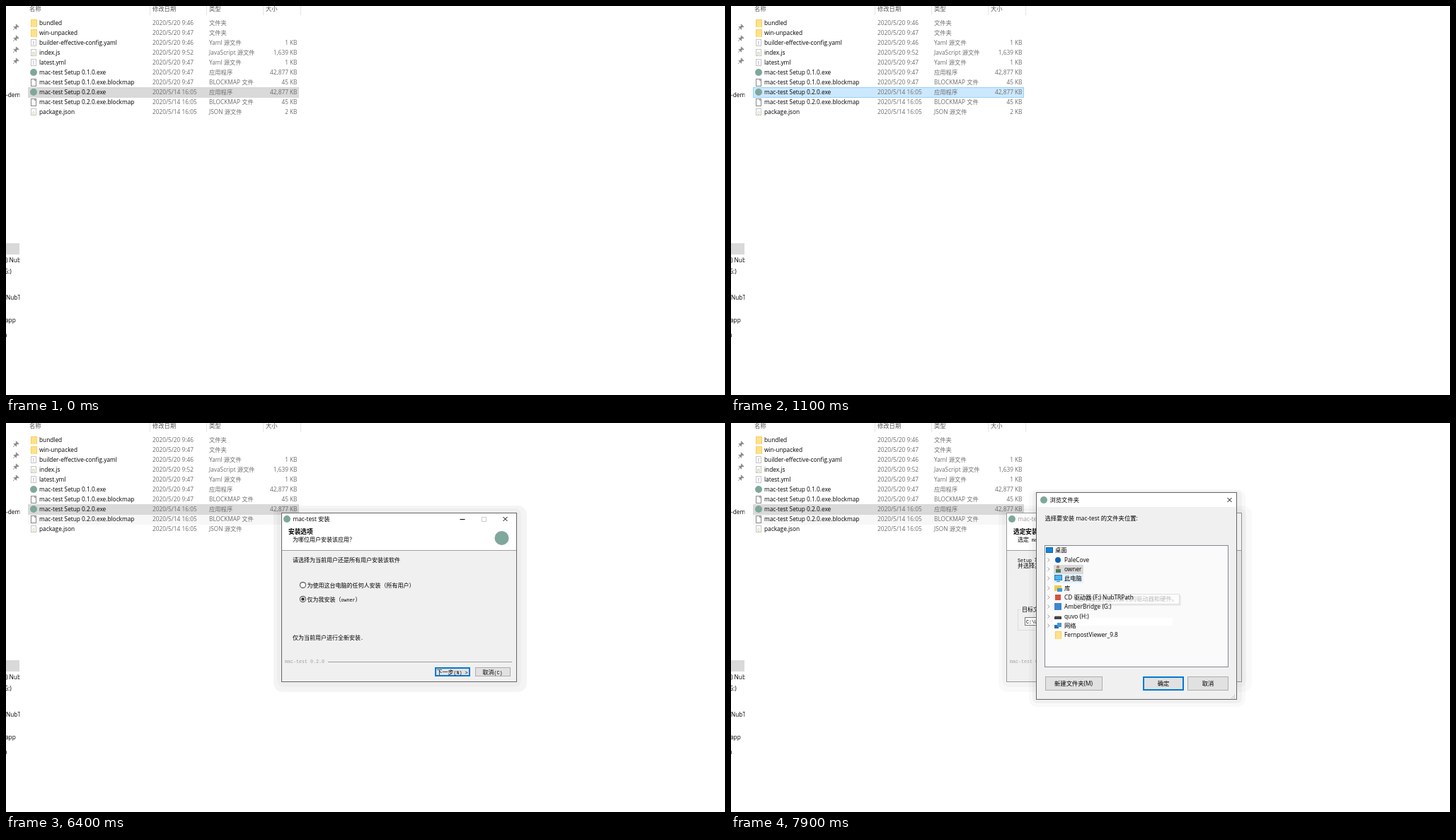
These frames come from a looping animation (1016x551 px, 8 s). An HTML page with a canvas:

```html
<!DOCTYPE html>
<html lang="zh-CN">
<head>
<meta charset="utf-8">
<title>mac-test 安装</title>
<style>
html, body { margin: 0; width: 100%; height: 100%; overflow: hidden; background: #fff; }
canvas { display: block; }
</style>
</head>
<body>
<canvas id="stage" width="1016" height="551"></canvas>
<script>
const LOOP = 8000;
const ctx = document.getElementById('stage').getContext('2d');
const CJK = '"Noto Sans CJK SC", "Noto Sans CJK JP", "Noto Sans CJK", sans-serif';
const UI = '"Open Sans", ' + CJK;
const MONO = '"Liberation Mono", monospace';
const BLUE = '#0078d7', APP = '#7fa79b';

const files = [
  ['bundled', '2020/5/20 9:46', '文件夹', '', 'folder'],
  ['win-unpacked', '2020/5/20 9:47', '文件夹', '', 'folder'],
  ['builder-effective-config.yaml', '2020/5/20 9:46', 'Yaml 源文件', '1 KB', '!'],
  ['index.js', '2020/5/20 9:52', 'JavaScript 源文件', '1,639 KB', 'JS'],
  ['latest.yml', '2020/5/20 9:47', 'Yaml 源文件', '1 KB', '!'],
  ['mac-test Setup 0.1.0.exe', '2020/5/20 9:47', '应用程序', '42,877 KB', 'app'],
  ['mac-test Setup 0.1.0.exe.blockmap', '2020/5/20 9:47', 'BLOCKMAP 文件', '45 KB', 'page'],
  ['mac-test Setup 0.2.0.exe', '2020/5/14 16:05', '应用程序', '42,877 KB', 'app'],
  ['mac-test Setup 0.2.0.exe.blockmap', '2020/5/14 16:05', 'BLOCKMAP 文件', '45 KB', 'page'],
  ['package.json', '2020/5/14 16:05', 'JSON 源文件', '2 KB', '{}']
];
const tree = ['PaleCove', 'owner', '此电脑', '库', 'CD 驱动器 (F:) NubTRPath',
  'AmberBridge (G:)', 'quvo (H:)', '网络', 'FernpostViewer_9.8'];

function fill(x, y, w, h, color) {
  ctx.fillStyle = color;
  ctx.fillRect(x, y, w, h);
}

function box(x, y, w, h, color, edge, line = 1) {
  fill(x, y, w, h, color);
  ctx.strokeStyle = edge;
  ctx.lineWidth = line;
  ctx.strokeRect(x + line / 2, y + line / 2, w - line, h - line);
}

function path(points, color, width = 1) {
  ctx.beginPath();
  points.forEach(([x, y]) => ctx.lineTo(x, y));
  ctx.strokeStyle = color;
  ctx.lineWidth = width;
  ctx.stroke();
}

function disc(x, y, r, color) {
  ctx.beginPath();
  ctx.arc(x, y, r, 0, 7);
  ctx.fillStyle = color;
  ctx.fill();
}

// y is the middle of the line in both text helpers
function text(s, x, y, color = '#000', align = 'left', size = 8.3) {
  ctx.font = size + 'px ' + UI;
  ctx.textAlign = align;
  ctx.fillStyle = color;
  ctx.fillText(s, x, y + 3);
}

// Half-width Latin next to full-width Chinese
function song(s, x, y, color = '#000', size = 8, weight = '') {
  ctx.textAlign = 'left';
  ctx.fillStyle = color;
  for (const run of s.match(/[ -~]+|[^ -~]+/g)) {
    const latin = run.charCodeAt(0) < 127;
    ctx.font = `${weight} ${latin ? size / 1.2 : size}px ${latin ? MONO : CJK}`;
    ctx.fillText(run, x, y + 3);
    x += run.length * size / (latin ? 2 : 1);
  }
}

function halo(x, y, w, h, r, alpha) {
  ctx.fillStyle = `rgba(0,0,0,${alpha})`;
  ctx.beginPath();
  ctx.roundRect(x, y, w, h, r);
  ctx.fill();
}

function button(x, y, w, h, state) {
  const [color, edge, line] = {
    plain: ['#e1e1e1', '#adadad', 1],
    main: ['#e1e1e1', BLUE, 2],
    warm: ['#e3e9ee', BLUE, 2],
    hover: ['#e5f1fb', BLUE, 1],
    press: ['#cce4f7', '#005499', 1]
  }[state];
  box(x, y, w, h, color, edge, line);
}

function cross(x, y) {
  path([[x - 3, y - 3], [x + 3, y + 3]], '#000');
  path([[x + 3, y - 3], [x - 3, y + 3]], '#000');
}

function folder(x, y) {
  fill(x, y - 5, 9, 11, '#f5cf5d');
  fill(x + 1, y - 4, 7, 10, '#ffe18a');
}

function fileIcon(kind, y) {
  if (kind === 'folder') return folder(35, y);
  if (kind === 'app') return disc(39, y, 5, APP);
  const blank = kind === 'page';
  box(35, y - 5, 8, blank ? 11 : 10, '#fff', blank ? '#888' : '#c4c4c4');
  if (blank) path([[40.5, y - 5], [40.5, y - 2.5], [43, y - 2.5]], '#888');
  else text(kind, 39, y, { '!': '#8a4fa0', JS: '#87a63c', '{}': '#b4a25a' }[kind], 'center', kind === '!' ? 7 : 5);
}

function pin(y) {
  path([[10, y + 4], [13, y + 1]], '#999');
  path([[11, y - 1], [15, y + 3]], '#8a8a8a', 1.5);
  path([[13, y + 1], [16, y - 2]], '#8a8a8a', 3);
  path([[14, y - 4], [18, y]], '#8a8a8a', 1.5);
}

function sidebar() {
  [30, 46, 62, 78].forEach(pin);
  ctx.save();
  ctx.beginPath();
  ctx.rect(0, 0, 19.5, 551);
  ctx.clip();
  fill(0, 336, 19, 16, '#d9d9d9');
  text('-demo', 0, 126);
  text(') NubTRPath', 0, 360);
  text('G:)', -3, 376);
  text('NubTRPath', 0, 413);
  text('app', -1, 445);
  text('n', -3.5, 466);
  ctx.restore();
}

function explorer(t) {
  sidebar();
  [[33, '名称'], [207, '修改日期'], [287, '类型'], [367, '大小']].forEach(([x, s]) => text(s, x, 4, '#555'));
  [203, 283, 363, 416].forEach(x => fill(x, 0, 1, 13, '#e5e5e5'));

  const rowAt = i => 17 + 14 * i;
  if (t >= 600 && t < 800) fill(31, rowAt(6), 383, 14, '#e5f3ff');
  const below = (t >= 900 && t < 1100) || t >= 3900;
  if (below) fill(31, rowAt(8), 383, 15, t < 5800 ? '#e5f3ff' : '#f7f7f7');
  const lit = (t >= 500 && t < 600) || (t >= 800 && t < 900) || (t >= 1100 && t < 5400);
  if (lit) box(31, rowAt(7), 383, 15, '#cce8ff', '#99d1ff');
  else fill(31, rowAt(7), 383, 15, '#d9d9d9');

  files.forEach(([name, date, type, size, kind], i) => {
    const y = 24 + 14 * i;
    fileIcon(kind, y);
    text(name, 47, y);
    text(date, 207, y, '#6d6d6d');
    text(type, 287, y, '#6d6d6d');
    text(size, 411.5, y, '#6d6d6d', 'right');
  });
}

function radio(y, on, hot) {
  disc(419.5, y, 4.5, hot ? BLUE : '#333');
  disc(419.5, y, 3.6, '#fff');
  if (on) disc(419.5, y, 2.3, hot ? BLUE : '#333');
}

function optionsPage(t) {
  song('安装选项', 399, 154, '#000', 8.67, 'bold');
  song('为哪位用户安装该应用？', 405, 165);
  song('请选择为当前用户还是所有用户安装该软件', 405, 194);
  radio(229.5, false);
  song('为使用这台电脑的任何人安装（所有用户）', 425.5, 230);
  radio(249.5, true, t >= 6000 && t < 6100);
  song('仅为我安装（owner）', 425.5, 250);
  song('仅为当前用户进行全新安装.', 405, 304);
  button(606, 346, 50, 13, t < 6500 ? 'main' : t < 6600 ? 'warm' : 'press');
  song('下一步(N) >', 608.5, 352.5);
}

function folderPage(t) {
  song('选定安装位置', 399, 154, '#000', 8.67, 'bold');
  song('选定 mac-test 要安装的文件夹。', 405, 165);
  song('Setup 将安装 mac-test 在下列文件夹。要安装到不同文件夹，单击 [浏览(B)...]', 405, 194);
  song('并选择其他的文件夹。 单击 [安装(I)] 开始安装进程。', 405, 202);
  box(405, 264, 300, 30, '#f0f0f0', '#dcdcdc');
  fill(409, 262, 44, 5, '#f0f0f0');
  song('目标文件夹', 411, 264);
  box(415, 275, 210, 12, '#fff', t >= 7400 && t < 7700 ? BLUE : '#7a7a7a');
  song('C:\\Users\\owner\\AppData\\Local\\Programs\\mac-test', 417, 281);
  button(633, 274, 60, 14, t < 7500 ? 'plain' : 'press');
  song('浏览(B)...', 643, 281);
  button(556, 346, 49, 13, 'plain');
  song('< 上一步(P)', 558.5, 352.5);
  button(606, 346, 50, 13, t < 6900 ? 'warm' : t < 7300 ? 'hover' : t < 7500 ? 'main' : 'plain');
  song('安装(I)', 616.5, 352.5);
}

function installer(t) {
  const idle = t >= 7700;
  halo(378, 117, 358, 264, 13, idle ? 0.025 : 0.045);
  halo(383, 121, 345, 253, 9, 0.025);
  box(389, 127, 333, 240, '#f0f0f0', idle ? '#999' : '#666');
  fill(390, 128, 331, 52, '#fff');
  fill(390, 180, 331, 1, '#a0a0a0');
  disc(397, 136, 5, APP);
  text('mac-test 安装', 405.5, 136, idle ? '#999' : '#000');
  path([[641.5, 136.5], [648.5, 136.5]], '#000');
  box(672, 133, 7, 7, '#fff', '#ccc');
  cross(705.5, 136);
  disc(700.5, 163, 10, APP);
  song('mac-test 0.2.0', 394, 337, '#a0a0a0');
  fill(455, 338, 260, 1, '#a0a0a0');
  (t < 6700 ? optionsPage : folderPage)(t);
  button(663, 346, 50, 13, 'plain');
  song('取消(C)', 673.5, 352.5);
}

function treeIcon(i, y) {
  const x = 457;
  if (i === 0) disc(x + 5, y, 4, '#0a64b4');
  else if (i === 1) {
    disc(x + 5, y - 3, 2.3, '#b88a62');
    fill(x + 2, y, 7, 5, '#4c7d63');
  } else if (i === 2) {
    box(x, y - 5, 11, 8, '#4cb4f0', '#2779b5');
    fill(x + 3, y + 4, 5, 1, '#2779b5');
  } else if (i === 3) {
    fill(x, y - 4, 10, 8, '#f5c84c');
    fill(x + 4, y, 7, 5, '#3a9ad9');
  } else if (i === 4) fill(x + 1, y - 4, 8, 8, '#d9503c');
  else if (i === 5) fill(x, y - 5, 10, 10, '#3f86d0');
  else if (i === 6) {
    fill(x, y, 10, 4, '#444');
    fill(x + 1, y - 1, 8, 1, '#bbb');
  } else if (i === 7) {
    fill(x, y - 1, 6, 5, '#2b6ca8');
    fill(x + 4, y - 4, 6, 6, '#4497dc');
  } else folder(x + 1, y);
}

function browser(t) {
  const settled = t >= 7900;
  halo(421, 94, 306, 308, 11, 0.025);
  halo(426, 96, 296, 301, 7, 0.035);
  box(431, 98, 284, 294, '#f0f0f0', '#666');
  fill(432, 99, 282, 20, '#fff');
  disc(442, 109, 5, APP);
  text('浏览文件夹', 450.5, 109);
  cross(704.5, 109);
  text('选择要安装 mac-test 的文件夹位置:', 443.5, 135);
  box(443, 173, 260, 173, settled ? '#fafafa' : '#fff', '#828790');
  if (settled) fill(455, 276, 169, 11, '#fff');
  box(445, 176, 10, 8, '#1684d8', '#0a62ad');
  text('桌面', 458, 180);

  const rowAt = i => Math.round(193.7 + 13.33 * i);
  fill(456, rowAt(1) - 6, 42, 13, '#d9d9d9');
  if (settled) {
    fill(456, rowAt(2) - 6, 42, 13, '#e5f3ff');
    fill(489, 244, 147, 15, 'rgba(0,0,0,.06)');
    box(487, 242, 147, 15, 'rgba(255,255,255,.85)', '#ddd');
    text('显示连接到此计算机的驱动器和硬件。', 490, 249, '#bbb');
  }
  tree.forEach((name, i) => {
    const y = rowAt(i);
    if (i < 8) path([[447.5, y - 2.5], [450, y], [447.5, y + 2.5]], '#a0a0a0');
    treeIcon(i, y);
    text(name, 471, y);
  });

  button(444, 359, 81, 20, 'plain');
  text('新建文件夹(M)', 484, 369, '#000', 'center');
  button(582, 359, 58, 20, 'main');
  text('确定', 611, 369, '#000', 'center');
  button(645, 359, 58, 20, 'plain');
  text('取消', 674, 369, '#000', 'center');
  for (let i = 0; i < 3; i++)
    for (let j = 0; j <= i; j++) fill(711 - 2 * j, 385 + 2 * i, 1, 1, '#aaa');
}

function draw(now) {
  const t = now % LOOP;
  fill(0, 0, 1016, 551, '#fff');
  explorer(t);
  if (t >= 5400) installer(t);
  if (t >= 7700) {
    ctx.globalAlpha = t < 7800 ? 0.55 : 1;
    browser(t);
    ctx.globalAlpha = 1;
  }
  requestAnimationFrame(draw);
}
requestAnimationFrame(draw);
</script>
</body>
</html>
```
